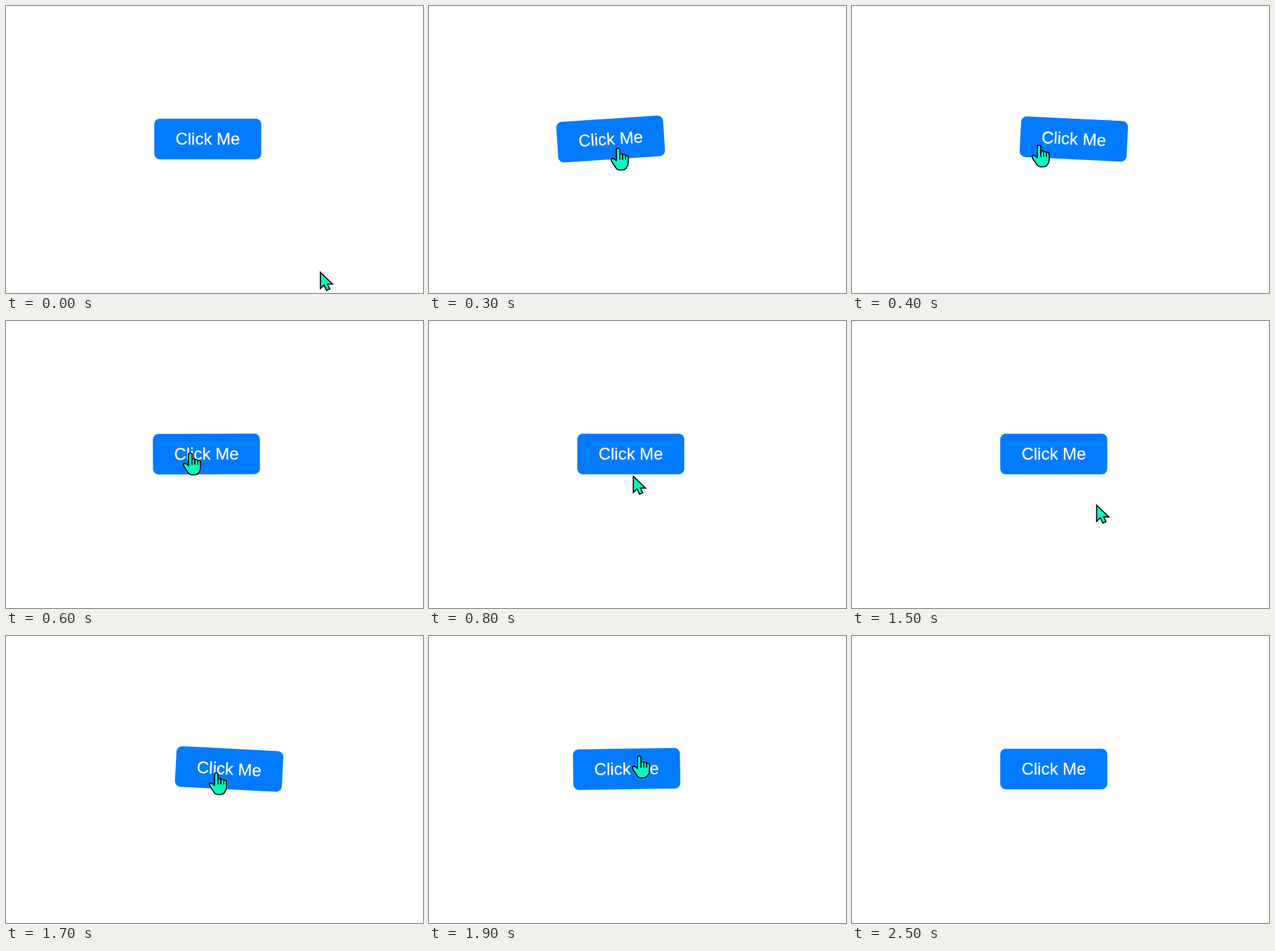
An HTML page that plays this animation: 594x410 px, repeating every 2.6 s.

```html
<!DOCTYPE html>
<html lang="en">
<head>
<meta charset="utf-8">
<title>Wobble button</title>
<style>
  html, body { margin: 0; width: 100%; height: 100%; overflow: hidden; background: #fff; }
  svg { display: block; width: 594px; height: 410px; }
  text { font: 24px Arial, "Liberation Sans", sans-serif; fill: #fff; stroke: #fff; stroke-width: .25; }
  .cursor { fill: #00ffbf; stroke: #000; stroke-width: 1.6; stroke-linejoin: round; stroke-linecap: round; }
</style>
</head>
<body>
<svg viewBox="0 0 594 410">
  <g id="button">
    <rect x="-76.2" y="-29" width="152.4" height="58" rx="8" fill="#007bff"/>
    <text x="0" y="8" text-anchor="middle">Click Me</text>
  </g>
  <path id="arrow" class="cursor" style="stroke-linejoin: miter"
    d="M.8 1.5V24.6L6 19.6L9.6 27.2L14.2 25.1L10.7 18.3H18.2Z"/>
  <g id="hand" class="cursor">
    <path d="M-2 2Q-2 0 .5 0Q3 0 3 2V9.5Q3 8 5 8Q7 8 7 10Q7 9 9 9Q11 9 11 11
      Q11 10.3 12.6 10.3Q15 10.6 15 13V21Q15 25 12.8 27Q11.5 31 5.5 31H3.5
      Q-1 31 -2.5 28Q-6 23 -9 18.2Q-10 15 -7.5 14.5Q-5 14.5 -2 18Z"/>
    <path d="M3 9.5V16M7 10V16M11 11V16" fill="none"/>
  </g>
</svg>
<script>
const LOOP = 2600, STEP = 100;
const SIZE = { w: 152.4, h: 58 }, CENTER = { x: 287.4, y: 190 };
const WOBBLE = 500, HOVERS = [266, 1550];

// Swings alternate left and right and shrink evenly; tilt in degrees per swing
const TILTS = [0, 5, 3, 3, 2, 1, 0];
const SWING = .15;

// The pointer glides between a few resting places, then vanishes
const HOME = { x: 447, y: 379 }, GONE = 2400;
const GLIDES = [
  { from: 60, to: 315, x: 267, y: 201.5 },
  { from: 315, to: 600, x: 262, y: 188.7 },
  { from: 700, to: 1100, x: 443, y: 391 },
  { from: 1250, to: 1660, x: 299, y: 195.5 },
  { from: 1800, to: 1900, x: 299, y: 171.5 }
];

const button = document.getElementById("button");
const arrow = document.getElementById("arrow");
const hand = document.getElementById("hand");

const mix = (a, b, k) => a + (b - a) * k;
const clamp = p => Math.min(1, Math.max(0, p));
const smooth = p => p * p * (3 - 2 * p);
const bezier = (a, b, u) => 3 * a * u * (1 - u) ** 2 + 3 * b * u * u * (1 - u) + u ** 3;

// CSS "ease": cubic-bezier(.25, .1, .25, 1)
function ease(p) {
  let lo = 0, hi = 1;
  for (let i = 0; i < 24; i++) {
    const mid = (lo + hi) / 2;
    if (bezier(.25, .25, mid) < p) lo = mid; else hi = mid;
  }
  return bezier(.1, 1, lo);
}

function swing(i) {
  const side = i % 2 ? -1 : 1;
  const reach = TILTS[i] ? .3 - .05 * i : 0;
  return { shift: side * reach * SIZE.w, tilt: side * TILTS[i] };
}

function wobble(time) {
  const start = HOVERS.find(h => time >= h && time < h + WOBBLE);
  if (start === undefined) return swing(0);
  const phase = (time - start) / WOBBLE;
  const i = Math.min(5, Math.floor(phase / SWING));
  const end = i === 5 ? 1 : (i + 1) * SWING;
  const k = ease((phase - i * SWING) / (end - i * SWING));
  const a = swing(i), b = swing(i + 1);
  return { shift: mix(a.shift, b.shift, k), tilt: mix(a.tilt, b.tilt, k) };
}

function pointer(time) {
  return GLIDES.reduce((at, g) => {
    const k = smooth(clamp((time - g.from) / (g.to - g.from)));
    return { x: mix(at.x, g.x, k), y: mix(at.y, g.y, k) };
  }, HOME);
}

function show(node, visible) {
  node.setAttribute("visibility", visible ? "visible" : "hidden");
}

function draw(time) {
  const { shift, tilt } = wobble(time);
  button.setAttribute("transform",
    `translate(${CENTER.x + shift} ${CENTER.y}) rotate(${tilt})`);

  const { x, y } = pointer(time);
  const over = Math.abs(x - CENTER.x) < SIZE.w / 2 && Math.abs(y - CENTER.y) < SIZE.h / 2;
  for (const node of [arrow, hand]) node.setAttribute("transform", `translate(${x} ${y})`);
  show(arrow, time < GONE && !over);
  show(hand, time < GONE && over);
}

const origin = performance.now();

// The picture advances in steps of a tenth of a second
function tick() {
  const time = (performance.now() - origin) % LOOP;
  draw(Math.floor(time / STEP) * STEP);
  requestAnimationFrame(tick);
}
tick();
</script>
</body>
</html>
```
